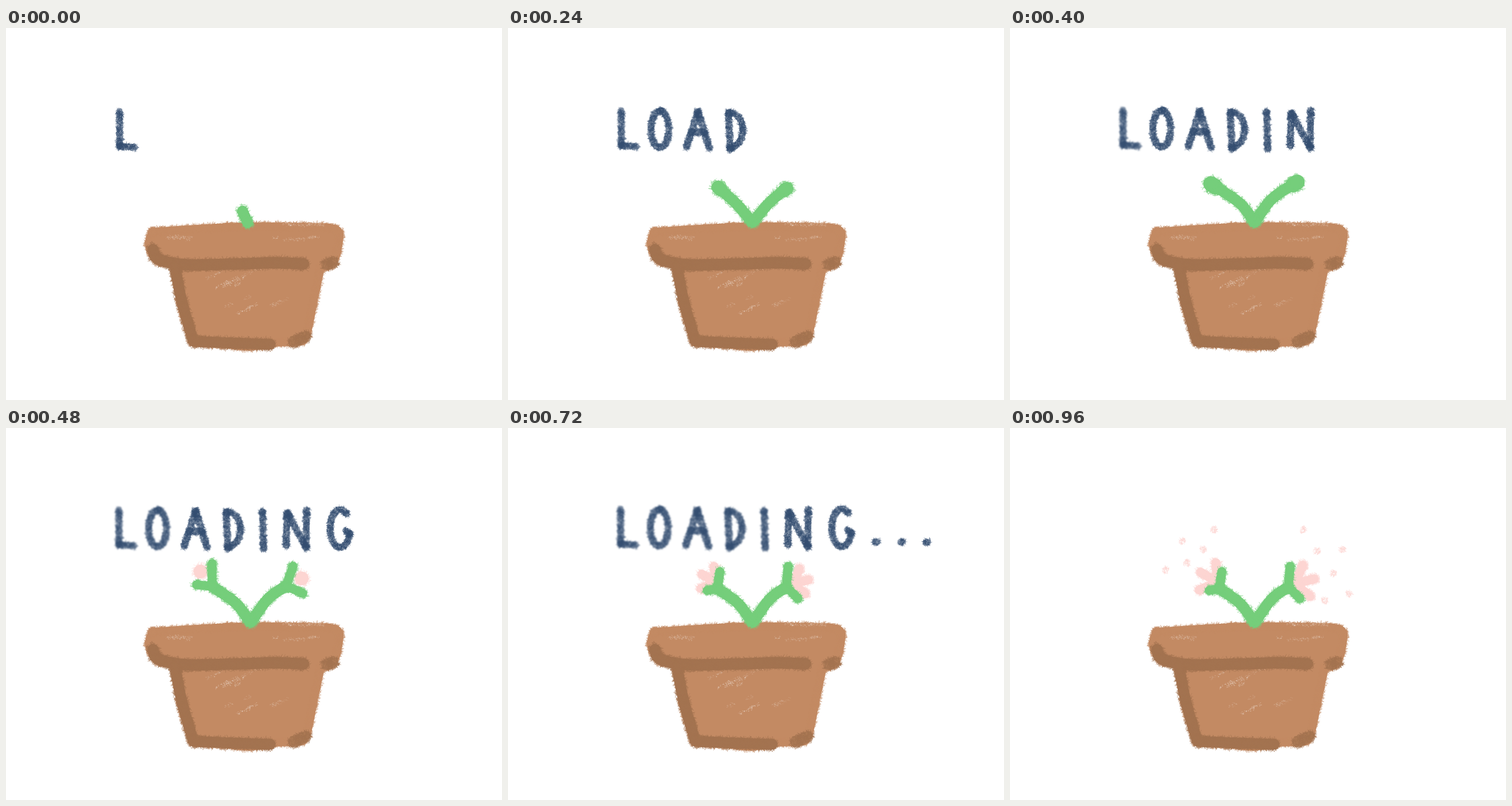
An HTML page with a canvas for the animation above (1.04 s loop, 864 px wide and 648 px high).

```html
<!DOCTYPE html>
<html lang="en">
<head>
<meta charset="utf-8">
<title>Loading plant</title>
<style>
  html, body { margin: 0; width: 100%; height: 100%; overflow: hidden; background: #fff; }
  canvas { display: block; width: 100vw; height: 100vh; }
</style>
</head>
<body>
<canvas id="stage" width="864" height="648" role="img" aria-label="LOADING..."></canvas>
<script>
const W = 864, H = 648, STEP = 80, COUNT = 13;
const CLAY = '#c38a63', SHADE = '#a37350', GREEN = '#75ce7b', PINK = '#fdd5d2', NAVY = '#344e71';

function random(seed) {
  let s = seed >>> 0;
  return () => {
    s = (s + 0x6d2b79f5) >>> 0;
    let t = Math.imul(s ^ (s >>> 15), 1 | s);
    t = (t + Math.imul(t ^ (t >>> 7), 61 | t)) ^ t;
    return ((t ^ (t >>> 14)) >>> 0) / 4294967296;
  };
}

function layer() {
  const c = document.createElement('canvas');
  c.width = W;
  c.height = H;
  return c;
}

const points = text => text.split(' ').map(p => p.split(',').map(Number));
const mix = (a, b, t) => a.map((v, i) => v + (b[i] - v) * t);
const clamp = v => Math.max(0, Math.min(1, v));

function polar([x, y], deg, rx, ry = rx) {
  const a = deg * Math.PI / 180;
  return [x + Math.cos(a) * rx, y + Math.sin(a) * ry];
}

const arc = (centre, rx, ry, from, to) =>
  Array.from({ length: 13 }, (_, i) => polar(centre, from + (to - from) * i / 12, rx, ry));

// Catmull-Rom curve sampled about once per pixel
function curve(pts) {
  const out = [];
  for (let i = 0; i < pts.length - 1; i++) {
    const a = pts[Math.max(i - 1, 0)], b = pts[i], c = pts[i + 1];
    const d = pts[Math.min(i + 2, pts.length - 1)];
    const n = Math.max(1, Math.round(Math.hypot(c[0] - b[0], c[1] - b[1])));
    for (let k = 0; k < n; k++) {
      const t = k / n;
      out.push([0, 1].map(j => b[j] + t / 2 * (c[j] - a[j] +
        t * (2 * a[j] - 5 * b[j] + 4 * c[j] - d[j] + t * (3 * (b[j] - c[j]) + d[j] - a[j])))));
    }
  }
  out.push(pts[pts.length - 1]);
  return out;
}

// Crayon line: a core with short random bristles; a weak core shows its grain
function crayon(g, pts, width, color, { core = 1, hairs = 5, size = 6 } = {}) {
  const line = curve(pts), r = width / 2;
  const rnd = random(Math.round(pts[0][0] * 97 + pts[0][1] * 31 + width));
  g.save();
  g.strokeStyle = color;
  g.lineCap = g.lineJoin = 'round';
  g.lineWidth = width * 0.86;
  g.globalAlpha = core;
  g.beginPath();
  line.forEach(([x, y]) => g.lineTo(x, y));
  if (line.length === 1) g.lineTo(line[0][0] + 0.01, line[0][1]);
  g.stroke();
  g.lineWidth = 0.9;
  const caps = r * hairs, total = line.length * hairs + caps;
  for (let i = 0; i < total; i++) {
    const at = line[i < caps ? (i % 2) * (line.length - 1) : Math.floor(rnd() * line.length)];
    const d = r * (core < 1 ? Math.sqrt(rnd()) : 0.7 + 0.35 * rnd());
    const [x, y] = polar(at, rnd() * 360, d);
    const [dx, dy] = polar([0, 0], rnd() * 360, size * (0.25 + 0.4 * rnd()));
    g.globalAlpha = 0.4 + 0.5 * rnd();
    g.beginPath();
    g.moveTo(x - dx, y - dy);
    g.lineTo(x + dx, y + dy);
    g.stroke();
  }
  g.restore();
}

const draw = (g, text, width, color, opt) => crayon(g, points(text), width, color, opt);

// Random streaks of bare paper inside a box
function grain(g, [x, y, w, h], slope, count, seed) {
  const rnd = random(seed);
  g.save();
  g.fillStyle = '#f3e6dc';
  for (let k = 0; k < count; k++) {
    const sx = x + w * rnd(), sy = y + h * rnd(), len = 8 + 34 * rnd(), strength = 0.2 + 0.4 * rnd();
    for (let i = 0; i < len * 1.8; i++) {
      const t = rnd() * len;
      g.globalAlpha = strength * rnd();
      g.fillRect(sx + t, sy + t * slope + (rnd() + rnd() - 1) * 4, 0.7 + rnd() * 1.6, 1);
    }
  }
  g.restore();
}

function drawPot(g) {
  const sides = [
    '255,355 330,350 410,346 500,346 573,350 579,376 569,410 548,417',
    '548,417 537,470 522,537 503,547 470,548 425,555 380,551 326,546',
    '326,546 307,490 292,416 264,405 249,378 255,355'
  ].map(points);
  g.fillStyle = CLAY;
  g.beginPath();
  sides.forEach(s => curve(s).forEach(([x, y]) => g.lineTo(x, y)));
  g.fill();
  sides.forEach(s => crayon(g, s, 16, CLAY));

  grain(g, [265, 362, 280, 8], -.03, 7, 4);
  grain(g, [470, 341, 70, 1], .02, 4, 8);
  grain(g, [335, 432, 130, 68], -.45, 11, 23);

  draw(g, '256,386 265,402 310,412 400,411 470,409 518,411', 23, SHADE);
  draw(g, '295,418 306,475 326,545', 22, SHADE);
  draw(g, '328,546 400,549 460,551', 22, SHADE);
  const dab = { core: .55, hairs: 10 };
  draw(g, '558,412 570,408', 22, SHADE, dab);
  draw(g, '501,547 522,538', 22, SHADE, dab);
}

const letters = [
  [points('198,146 198,206'), points('198,206 224,208')],
  [arc([265, 177], 15.5, 32, -90, 270)],
  [points('331,146 311,208'), points('331,146 351,210'), points('320,182 343,182')],
  [points('384,147 387,212'), arc([385, 178], 24, 31, -85, 85)],
  [points('447,146 449,211')],
  [points('490,149 488,205'), points('491,149 522,207'), points('524,144 523,210')],
  [arc([582, 175], 17.5, 33, -50, -345), points('599,184 592,179')]
];
const dots = [0, 1, 2].map(i => [[[640 + 44 * i, 199], [643 + 44 * i, 199]]]);

// One more character per step; older ones soften and drift up
function drawText(g, step) {
  [...letters, ...dots].slice(0, step + 1).forEach((strokes, i) => {
    const age = step - i, c = layer(), q = c.getContext('2d');
    strokes.forEach(s => crayon(q, s, 13, NAVY, { core: .5, hairs: 6, size: 4.5 }));
    g.save();
    g.filter = age ? `blur(${Math.min(1.3, age * .18)}px)` : 'none';
    g.drawImage(c, -.2 * age, -.45 * age);
    g.restore();
  });
}

// tips at steps 0, 2, 4, 6, 8; calyx: half open pair, then open pair
const stems = [
  { root: [425, 338], bend: [400, 305], tips: points('425,338 391,288 341,267 359,276 365,280'),
    calyx: points('359,236 332,273 369,250 347,283'), bud: [339, 250], heart: [362, 269], facing: 211 },
  { root: [427, 338], bend: [456, 298], tips: points('427,338 459,297 512,262 488,275 485,277'),
    calyx: points('500,241 517,288 488,241 505,297'), bud: [515, 262], heart: [496, 271], facing: -13 }
];

function drawStem(g, { root, bend, tips, calyx }, step) {
  const k = Math.min(3, Math.floor(step / 2));
  const tip = step > 6 ? tips[4] : mix(tips[k], tips[k + 1], step / 2 - k);
  const mid = mix(mix(root, tip, .5), bend, clamp((step - 2) / 2));
  crayon(g, [root, mid, tip], 22, GREEN);
  if (step < 6) {
    crayon(g, [mix(tip, mid, step > 2 ? .15 : 0), tip], 21 + 2 * step, GREEN);
  } else {
    calyx.slice(step > 6 ? 2 : 0).slice(0, 2).forEach(end => crayon(g, [end, tip], 18, GREEN));
  }
}

function drawPetals(g, { bud, heart, facing }, step) {
  if (step === 6) crayon(g, [bud], 28, PINK);
  if (step < 7) return;
  const length = 37 * (1 - .62 ** (step - 6));
  [-53, 0, 53].forEach(a => crayon(g, [heart, polar(heart, facing + a, length)], 18, PINK));
}

// Pollen fans out from each flower, near and far by turns
function drawPollen(g, step) {
  const spread = step > 11 ? 1 : .7;
  const fan = (centre, turn, count) => {
    for (let i = 0; i < count; i++) {
      const at = polar(centre, -90 + turn * i, (i % 2 ? 54 : 85) * spread);
      crayon(g, [at], 12, PINK, { core: .15, hairs: 6, size: 4 });
    }
  };
  fan([355, 262], -20, 5);
  fan([510, 262], 27, 6);
}

const pot = layer();
drawPot(pot.getContext('2d'));

const frames = Array.from({ length: COUNT }, (_, step) => {
  const c = layer(), g = c.getContext('2d');
  g.fillStyle = '#fff';
  g.fillRect(0, 0, W, H);
  g.drawImage(pot, 0, 0);
  stems.forEach(s => drawPetals(g, s, step));
  if (step) stems.forEach(s => drawStem(g, s, step));
  else draw(g, '412,319 421,339', 22, GREEN);
  if (step > 10) drawPollen(g, step);
  else drawText(g, step);
  return c;
});

const view = document.getElementById('stage').getContext('2d');
const start = performance.now();

function play() {
  const t = Math.max(0, performance.now() - start) % (STEP * COUNT);
  view.drawImage(frames[Math.floor(t / STEP)], 0, 0);
  requestAnimationFrame(play);
}
play();
</script>
</body>
</html>
```
